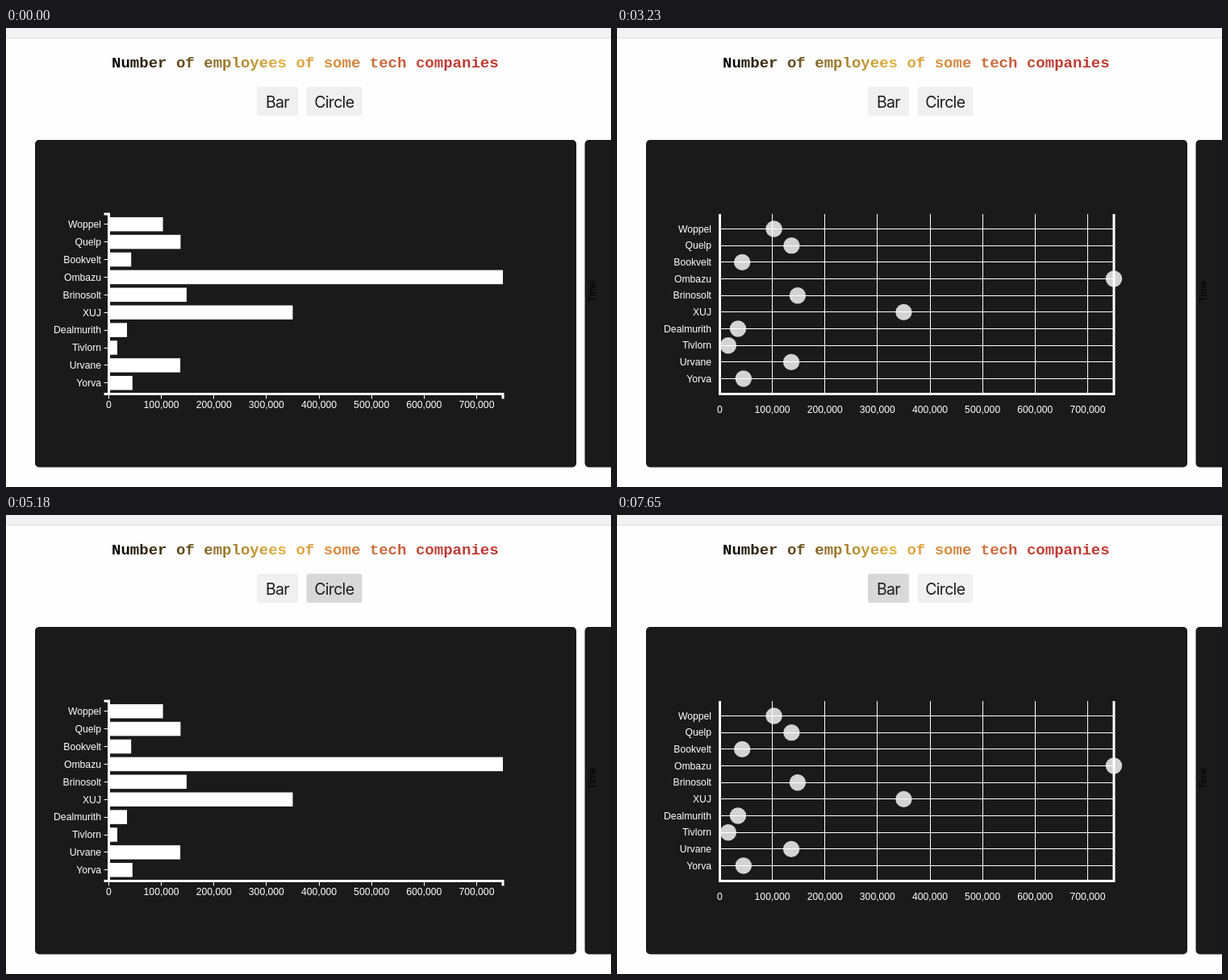
These frames come from a looping animation (750x570 px, 8000 ms). An HTML page:

```html
<!DOCTYPE html>
<html lang="en">
<head>
<meta charset="utf-8">
<title>Number of employees</title>
<style>
  html, body { margin: 0; width: 750px; height: 570px; overflow: hidden; background: #fefefe; }
  svg { display: block; }
  .title { font: bold 19.05px "Liberation Mono", "Courier New", monospace; }
  .btn { font: 19.5px Inter, sans-serif; letter-spacing: -.7px; text-anchor: middle; fill: #1c1c1c; }
  .axis { font: 12.2px "Liberation Sans", Arial, sans-serif; fill: #fff; }
  .line { stroke: #fff; fill: none; }
</style>
</head>
<body>
<svg width="750" height="570" viewBox="0 0 750 570">
  <defs>
    <linearGradient id="ink" gradientUnits="userSpaceOnUse" x1="131" x2="611">
      <stop offset="0" stop-color="#000"/>
      <stop offset=".19" stop-color="#69501f"/>
      <stop offset=".44" stop-color="#e3b441"/>
      <stop offset=".72" stop-color="#c9663c"/>
      <stop offset=".85" stop-color="#bd3c36"/>
      <stop offset="1" stop-color="#bf3a31"/>
    </linearGradient>
  </defs>
  <rect width="750" height="12" fill="#f2f2f2"/>
  <rect y="12" width="750" height="1" fill="#dedede"/>
  <text class="title" x="131" y="49" fill="url(#ink)">Number of employees of some tech companies</text>
  <rect id="barBtn" x="311" y="73" width="51" height="36" rx="3"/>
  <rect id="circleBtn" x="372.5" y="73" width="69" height="36" rx="3"/>
  <text class="btn" x="336.5" y="98.5">Bar</text>
  <text class="btn" x="406.8" y="98.5">Circle</text>
  <rect x="36" y="139" width="671" height="406.5" rx="5" fill="#1a1a1a"/>
  <rect x="717.5" y="139" width="100" height="406.5" rx="5" fill="#1a1a1a"/>
  <text class="axis" transform="translate(730.5 327) rotate(-90)" text-anchor="middle" style="fill:#000">Time</text>
  <g id="bars"></g>
  <g id="circles"></g>
</svg>
<script>
const $ = id => document.getElementById(id);

// Company name and head count in thousands
const data = [
  ["Woppel", 103], ["Quelp", 136.5], ["Bookvelt", 42.5], ["Ombazu", 750],
  ["Brinosolt", 148], ["XUJ", 350], ["Dealmurith", 34.5], ["Tivlorn", 16],
  ["Urvane", 136], ["Yorva", 45]
];
const left = 127.5, right = 616, top0 = 231, bottom = 454.5;
const xOf = k => left + k * .6513;
const snap = v => Math.floor(v) + .5;

const label = (x, y, text, anchor) =>
  `<text class="axis" x="${x}" y="${y}" text-anchor="${anchor}">${text}</text>`;
const path = (d, width) => `<path class="line" d="${d}" stroke-width="${width}"/>`;

function xAxis(labelY, y1, y2) {
  let out = "";
  for (let k = 0; k <= 700; k += 100) {
    out += path(`M${snap(xOf(k))} ${y1}V${y2}`, 1);
    out += label(xOf(k), labelY, k ? k + ",000" : "0", "middle");
  }
  return out;
}

function barChart() {
  let out = xAxis(472.3, bottom, 460.5);
  data.forEach(([name, k], i) => {
    const y = 243.7 + i * 21.9;
    out += `<rect x="${left}" y="${y - 8.75}" width="${xOf(k) - left}" height="17.5" fill="#fff"/>`;
    out += path(`M121.5 ${snap(y)}H${left}`, 1) + label(118, y + 4.3, name, "end");
  });
  return out +
    path(`M121.5 ${top0}H${left}V${bottom}H121.5`, 3) +
    path(`M${left} ${bottom}H${right}V460.5`, 3);
}

function circleChart() {
  let out = xAxis(478.3, top0, bottom), dots = "";
  data.forEach(([name, k], i) => {
    const y = 249.5 + i * 20.67;
    out += path(`M${left} ${snap(y)}H${right}`, 1) + label(117, y + 4.3, name, "end");
    dots += `<circle cx="${xOf(k)}" cy="${y}" r="10.2" fill="#fff" opacity=".81"/>`;
  });
  return out + path(`M${left} ${top0}V${bottom}H${right}V${top0}`, 3) + dots;
}

$("bars").innerHTML = barChart();
$("circles").innerHTML = circleChart();

const idle = "#f0f0f0", hover = "#d8d8d8", press = "#9a9a9a";
// Start time, Bar button, Circle button, visible chart
const steps = [
  [0, idle, idle, "bars"],
  [500, idle, hover, "bars"],
  [1410, idle, press, "bars"],
  [1540, idle, hover, "circles"],
  [3230, idle, idle, "circles"],
  [3490, hover, idle, "circles"],
  [4010, press, idle, "circles"],
  [4140, hover, idle, "bars"],
  [4530, idle, idle, "bars"],
  [5180, idle, hover, "bars"],
  [5960, idle, press, "bars"],
  [6090, idle, hover, "circles"],
  [6480, idle, idle, "circles"],
  [7650, hover, idle, "circles"]
];

const start = performance.now();
function draw() {
  const t = Math.max(0, performance.now() - start) % 8000;
  const [, bar, circle, chart] = steps.filter(s => s[0] <= t).pop();
  $("barBtn").setAttribute("fill", bar);
  $("circleBtn").setAttribute("fill", circle);
  for (const id of ["bars", "circles"]) $(id).style.display = id === chart ? "" : "none";
  requestAnimationFrame(draw);
}
draw();
</script>
</body>
</html>
```
